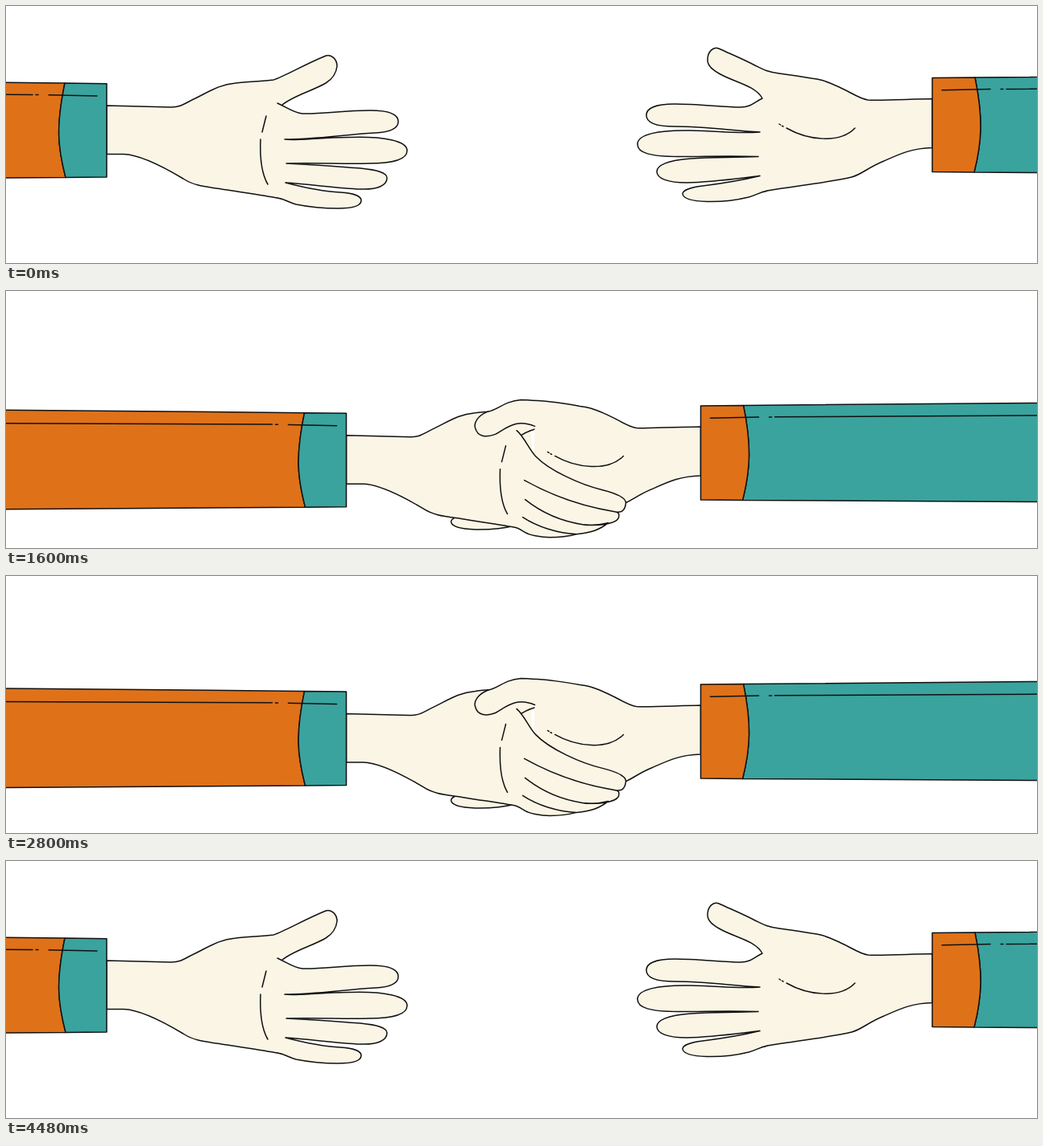
Recreate the animation shown at these times as an HTML page. Size 1280x320 px, loop 5 s.

```html
<!DOCTYPE html>
<html lang="en">
<head>
<meta charset="utf-8">
<title>Handshake</title>
<style>
  html, body { margin: 0; width: 100%; height: 100%; overflow: hidden; background: #fff; }
  svg { display: block; width: 100%; height: 100%; }
  path { stroke: #111; stroke-width: 1.5; stroke-linejoin: round; stroke-linecap: round; fill: none; }
  .skin { fill: #faf5e5; }
  .orange { fill: #df7119; }
  .teal { fill: #3aa39e; }
</style>
</head>
<body>
<svg viewBox="0 0 1280 320">
  <g class="right">
    <path class="skin" d="M939 115C930 119 925 126 912 126C890 126 860 122 830 122C805 122 795 128 795 136C795 145 805 150 830 150C870 150 900 155 936 157
      C905 159 890 156 850 155C810 154 784 160 784 172C784 183 800 187.500 835 187.500C870 187.500 900 186 934 187.500
      C900 189 880 188 850 190C820 192 808 199 808 206C808 215 822 220 845 220C880 219 905 215 936 211.500
      C905 219 880 222 865 224C848 226 840 230 840 234C841 240 850 243 870 243.500C890 244 910 241 922 238C932 235 936 232 945 230"/>
  </g>
  <g class="left">
    <path class="skin" id="leftPalm"/>
    <path d="M323 137L318 157M316 166C315 190 318 210 325 222"/>
    <path class="orange" d="M-320 92.300L73 96C62 150 64 175 74 213.500L-320 216.300Z"/>
    <path class="teal" d="M73 96L125 96.700V213L74 213.500C64 175 62 150 73 96Z"/>
    <path d="M-320 109L33 110.400M37 110.500H40M53 110.800L113 112"/>
  </g>
  <g class="right">
    <path class="skin" id="rightPalm"/>
    <path d="M960 147L961.500 148M963.500 149.300L965 150M969 152C995 167 1035 172 1054 152"/>
    <path class="teal" d="M1203 89L1590 85.800V209.200L1202 207C1212 168 1213 138 1203 89Z"/>
    <path class="orange" d="M1150 89.500L1203 89C1213 138 1212 168 1202 207L1150 206.500Z"/>
    <path d="M1162 104.700L1222 103.600M1235 103.500H1238M1242 103.400L1590 101.500"/>
  </g>
  <g class="left">
    <path class="skin" id="leftFingers"/>
  </g>
</svg>
<script>
const LOOP = 5000, STEP = 40;

// Pairs of [ms, value], eased between neighbours.
const REACH = [[0, 0], [1000, 1], [3480, 1], [4480, 0]];
const SHAKE = [[1000, 0], [1560, 1], [2000, 0], [2560, 1], [3480, 0]];
const GRIP = [[360, 0], [560, 1], [3600, 1], [3880, 0]];

const LEFT_WRIST = `M343 240L337 239C320 236 300 233 275 229C250 225 235 225 220 215
  C190 197 165 185 146 184.5L125 184.5L125 124L205 126C218 126 222 121 235 115
  C255 105 265 98 285 96C300 94 316 94 332 92`;
const RIGHT_WRIST = `M940 231.5L945 230C980 224 1020 220 1050 213C1062 210 1070 201 1090 193
  C1110 184 1125 177 1150 176.5L1150 115.5C1120 116 1085 118 1070 117
  C1060 116 1045 105 1030 99C1015 92 1008 91 1000 90C985 87 975 86 960 84`;

// Each part has an open and a gripping outline with matching segments.
const PARTS = [
  {
    id: "leftPalm",
    base: LEFT_WRIST,
    open: "C345 88 370 73 397 62C404 60 411 66 411 75C410 84 405 91 397 96C380 106 355 112 342 124",
    grip: "C350 91 370 92 385 93C395 93 402 98 402 105C402 111 398 115 392 115C375 113 360 113 342 124"
  },
  {
    id: "rightPalm",
    base: RIGHT_WRIST,
    open: `C945 82 940 79 930 74C915 66 900 60 885 53C878 50 871 57 871 67
      C871 75 878 80 887 85C905 95 930 99 939 115`,
    grip: `C945 83 935 82 927 82C905 84 900 94 885 97C873 102 868 111 870 117
      C873 129 885 129 895 125C908 118 920 105 944 115`
  },
  {
    id: "leftFingers",
    base: "",
    open: `M337 121C350 127 357 133 368 134C390 135 420 130 452 130C478 130 487 136 487 144
      C487 152 478 157 458 158C420 160 385 166 346 166
      C360 168 385 164 425 163.5C470 162 498 168 498 180C498 190 485 196 450 196C420 197 390 195 348 196
      C390 198 400 199 440 202C460 204 473 207 473 214C473 223 462 229 440 228C410 227 380 222 347 220
      C370 226 395 231 415 232C432 233 441 237 441 242C441 248 432 252 412 252
      C395 252 375 250 360 247C350 244 345 240 337 239`,
    grip: `M336.5 118C346 126 352 142 360 150C377 168 417 186 443 192C459 196 473 202 472 209
      C471 218 466 221 458 219C414 212 380 199 346 180
      C380 199 414 212 458 219C464 220 464 222 463 227C459 235 437 237 418 235C392 231 367 220 347 204
      C367 220 392 231 418 235C430 237 442 235 450 233C440 242 424 246 411 247C387 246 362 238 344 226
      C362 238 387 246 411 247C411 247 411 247 411 247C400 250 388 251 378 251
      C365 251 352 248 347 245C342 242 338 239 336 239`
  }
];

const NUMBER = /[\d.]+/g;

function valueAt(keys, time) {
  const next = keys.findIndex(([t]) => t > time);
  if (next === 0) return keys[0][1];
  if (next < 0) return keys[keys.length - 1][1];
  const [t0, v0] = keys[next - 1], [t1, v1] = keys[next];
  const p = (time - t0) / (t1 - t0);
  return v0 + (v1 - v0) * p * p * (3 - 2 * p);
}

function blend(from, to, amount) {
  const ends = to.match(NUMBER);
  let i = 0;
  return from.replace(NUMBER, n => (+n + (ends[i++] - n) * amount).toFixed(2));
}

function move(selector, x, y) {
  for (const group of document.querySelectorAll(selector))
    group.setAttribute("transform", `translate(${x} ${y})`);
}

function draw(now) {
  const time = Math.floor((now % LOOP) / STEP) * STEP;
  const reach = valueAt(REACH, time);
  const shake = valueAt(SHAKE, time);
  const grip = valueAt(GRIP, time);
  move(".left", 297.5 * reach, 57 * shake);
  move(".right", -287.5 * reach, 54.7 * shake);
  for (const part of PARTS)
    document.getElementById(part.id).setAttribute("d", part.base + blend(part.open, part.grip, grip));
}

let start;
function tick(now) {
  start ??= now;
  draw(now - start);
  requestAnimationFrame(tick);
}
draw(0);
requestAnimationFrame(tick);
</script>
</body>
</html>
```
